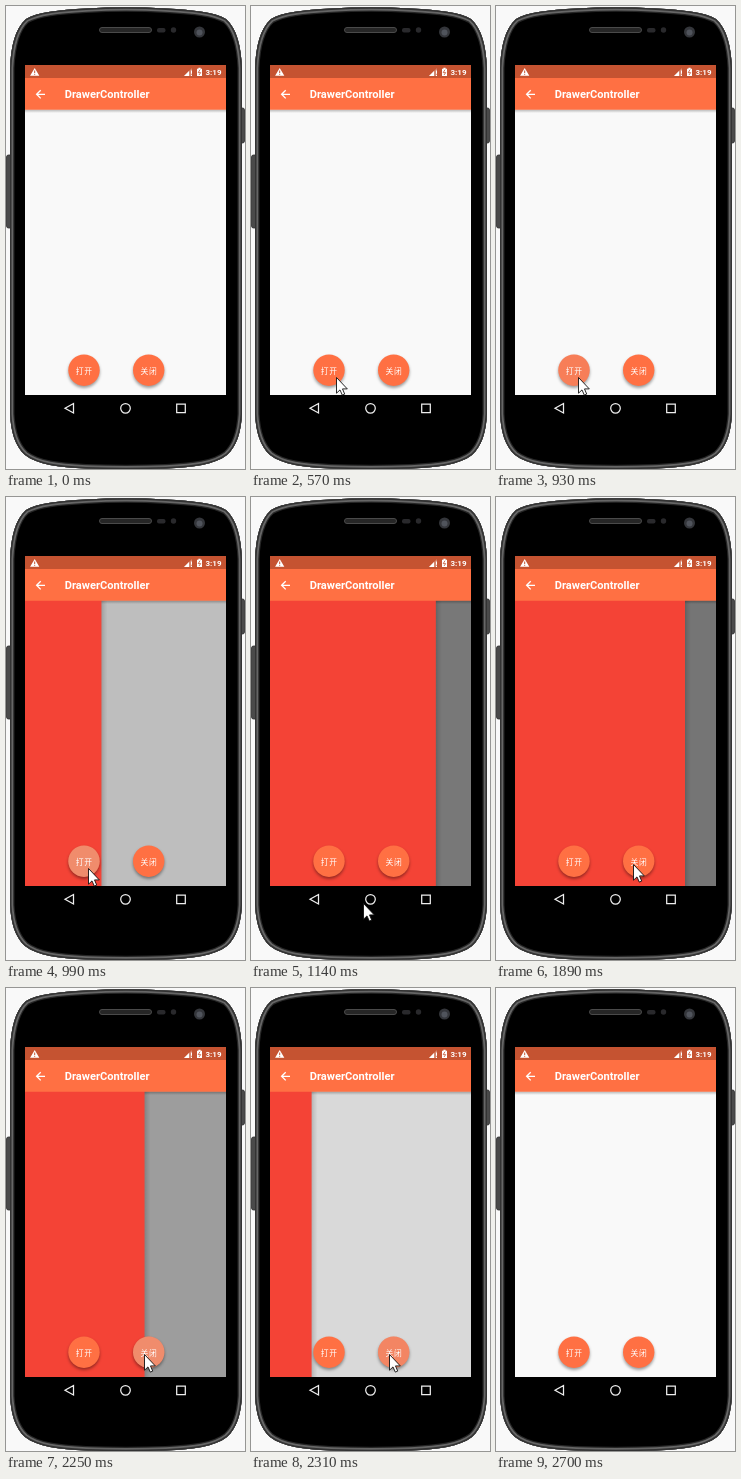
Recreate the animation shown at these times as an HTML page. Size 239x463 px, loop 3.36 s.

```html
<!DOCTYPE html>
<html lang="zh">
<head>
<meta charset="utf-8">
<title>DrawerController</title>
<style>
  html, body { margin: 0; width: 100%; height: 100%; overflow: hidden; background: #f9f9f9; }
  svg { display: block; width: 239px; height: 463px; }
  text { fill: #fff; font-family: Roboto, "Noto Sans CJK SC", "Noto Sans CJK", sans-serif; }
  .title { font-size: 11.1px; font-weight: 700; }
  .clock { font-size: 8px; font-weight: 700; }
  .label { font-size: 7.8px; letter-spacing: .8px; }
  .fab { filter: drop-shadow(0 2.2px 1.6px rgba(0, 0, 0, .38)); }
</style>
</head>
<body>
<svg viewBox="0 0 239 463" xmlns="http://www.w3.org/2000/svg">
  <defs>
    <path id="shell" d="M4 62C5 40 9 23 20 13C32 6 52 4 80 2.500Q120 0 160 2.500C188 4 208 6 220 13C231 23 235 40 236 62V408C235 426 231 440 221 449C208 459 188 461 160 462.500Q120 464 80 462.500C52 461 32 459 19 449C9 440 5 426 4 408Z"/>
    <linearGradient id="edge" x2="1" y2="0">
      <stop offset="0" stop-opacity=".17"/><stop offset=".4" stop-opacity=".09"/><stop offset="1" stop-opacity="0"/>
    </linearGradient>
    <linearGradient id="under" x2="0" y2="1">
      <stop offset="0" stop-opacity=".27"/><stop offset="1" stop-opacity="0"/>
    </linearGradient>
    <clipPath id="body"><use href="#shell"/></clipPath>
    <clipPath id="page"><path d="M19 103H220V389H19Z"/></clipPath>
  </defs>

  <!-- phone -->
  <g fill="#4a4a4a" stroke="#2b2b2b" stroke-width=".8">
    <rect x=".5" y="149" width="6" height="73" rx="2"/>
    <rect x="233" y="102" width="5.500" height="35" rx="2"/>
  </g>
  <use href="#shell"/>
  <g clip-path="url(#body)" fill="none">
    <use href="#shell" stroke="#262626" stroke-width="9"/>
    <use href="#shell" stroke="#666" stroke-width="6.500"/>
    <use href="#shell" stroke="#333" stroke-width="3"/>
  </g>
  <rect x="93.500" y="21.500" width="52" height="5" rx="2.500" fill="#262626" stroke="#4a4a4a"/>
  <rect x="151" y="22" width="8.500" height="4.500" rx="2" fill="#29292c"/>
  <circle cx="167.500" cy="24" r="2.700" fill="#29292c"/>
  <circle cx="193.500" cy="26" r="5.500" fill="#34363b"/>
  <circle cx="193.500" cy="26.500" r="3" fill="#50545c"/>

  <!-- page and drawer -->
  <g clip-path="url(#page)">
    <path d="M19 103H220V389H19Z" fill="#f9f9f9"/>
    <path d="M19 103.500H220V107H19Z" fill="url(#under)"/>
    <path id="scrim" d="M19 103H220V389H19Z" opacity="0"/>
    <g id="drawer">
      <path d="M19 103H189V389H19Z" fill="#f44336"/>
      <path id="shade" d="M189 103H195V389H189Z" fill="url(#edge)"/>
    </g>
  </g>

  <!-- bars -->
  <path d="M19 59H220V72H19Z" fill="#c55331"/>
  <path d="M19 72H220V103.700H19Z" fill="#ff7043"/>
  <path d="M28.700 62L33.300 69.800H24.100Z" fill="#fff"/>
  <path d="M28.700 64.500V67M28.700 67.800V68.800" stroke="#c55331"/>
  <path d="M186 62V70H178Z" fill="#fff" opacity=".3"/>
  <path d="M183 65V70H178Z" fill="#fff"/>
  <path d="M185.500 64.500V67.800M185.500 68.800V70" stroke="#fff"/>
  <path d="M191 62.700H192.400V61.800H194.600V62.700H196V70H191Z" fill="#fff"/>
  <path d="M194 63.700L192.200 66.600H194.700L193 69" fill="none" stroke="#c55331" stroke-width=".8"/>
  <text class="clock" x="199.500" y="69">3:19</text>
  <path d="M39 88.300H30.800M34.700 84.200L30.600 88.300L34.700 92.400" fill="none" stroke="#fff" stroke-width="1.300"/>
  <text class="title" x="58.700" y="92.300">DrawerController</text>
  <g fill="none" stroke="#eee" stroke-width="1.250">
    <path d="M67.500 397.500V407L59 402.200Z"/>
    <circle cx="119.500" cy="402.300" r="4.800"/>
    <path d="M170.700 398.200H179.300V406.500H170.700Z"/>
  </g>

  <!-- buttons -->
  <g class="fab">
    <circle cx="78" cy="364.200" r="15.700" fill="#ff7043"/>
    <circle cx="142.700" cy="364.200" r="15.700" fill="#ff7043"/>
  </g>
  <circle id="openGlow" cx="78" cy="364.200" r="15.700" fill="#ccc" opacity="0"/>
  <circle id="closeGlow" cx="142.700" cy="364.200" r="15.700" fill="#ccc" opacity="0"/>
  <g text-anchor="middle">
    <text class="label" x="78.300" y="367.500">打开</text>
    <text class="label" x="143" y="367.500">关闭</text>
  </g>

  <path id="cursor" d="M.500.500V16.200L4 12.900L6.300 18.100L8.700 17.100L6.500 11.900H11.300Z" fill="#fff" stroke="#111" stroke-width=".9" visibility="hidden"/>
</svg>
<script>
  const LOOP = 3360, WIDTH = 170, RATE = 0.0272;
  const OPEN_AT = 935, CLOSE_AT = 2211;
  const $ = id => document.getElementById(id);
  const [scrim, drawer, shade, openGlow, closeGlow, cursor] =
    ['scrim', 'drawer', 'shade', 'openGlow', 'closeGlow', 'cursor'].map($);

  // pointer stops: time, x, y
  const stops = [
    [80, 236, 67], [570, 85, 371], [660, 85, 371], [840, 82, 371], [1000, 82, 371],
    [1150, 112, 406], [1200, 113, 405], [1680, 135, 368], [1790, 135, 368],
    [1890, 137, 367], [2360, 138, 366], [2690, 215, 262]
  ];

  const clamp = v => Math.min(1, Math.max(0, v));
  const smooth = v => v * v * (3 - 2 * v);

  // critically damped spring, 0 to 1
  function spring(t) {
    const a = Math.max(0, t) * RATE;
    const s = 1 - (1 + a) * Math.exp(-a);
    return s > 0.997 ? 1 : s;
  }

  const glow = (t, start) =>
    0.3 * clamp((t - start) / 60) * (1 - clamp((t - start - 110) / 100));

  function pointer(t) {
    const i = stops.findIndex(s => s[0] > t);
    if (i < 1) return null;
    const [t0, x0, y0] = stops[i - 1], [t1, x1, y1] = stops[i];
    const k = smooth((t - t0) / (t1 - t0));
    return [x0 + (x1 - x0) * k, y0 + (y1 - y0) * k];
  }

  function draw(t) {
    const open = t < CLOSE_AT ? spring(t - OPEN_AT) : 1 - spring(t - CLOSE_AT);
    drawer.setAttribute('transform', `translate(${(open - 1) * WIDTH} 0)`);
    shade.setAttribute('opacity', clamp(open * 12));
    scrim.setAttribute('opacity', open * 0.53);
    openGlow.setAttribute('opacity', glow(t, 900));
    closeGlow.setAttribute('opacity', glow(t, 2180));
    const p = pointer(t);
    cursor.setAttribute('visibility', p ? 'visible' : 'hidden');
    if (p) cursor.setAttribute('transform', `translate(${Math.round(p[0])} ${Math.round(p[1])})`);
  }

  const start = performance.now();
  function tick() {
    draw((performance.now() - start) % LOOP);
    requestAnimationFrame(tick);
  }
  tick();
</script>
</body>
</html>
```
